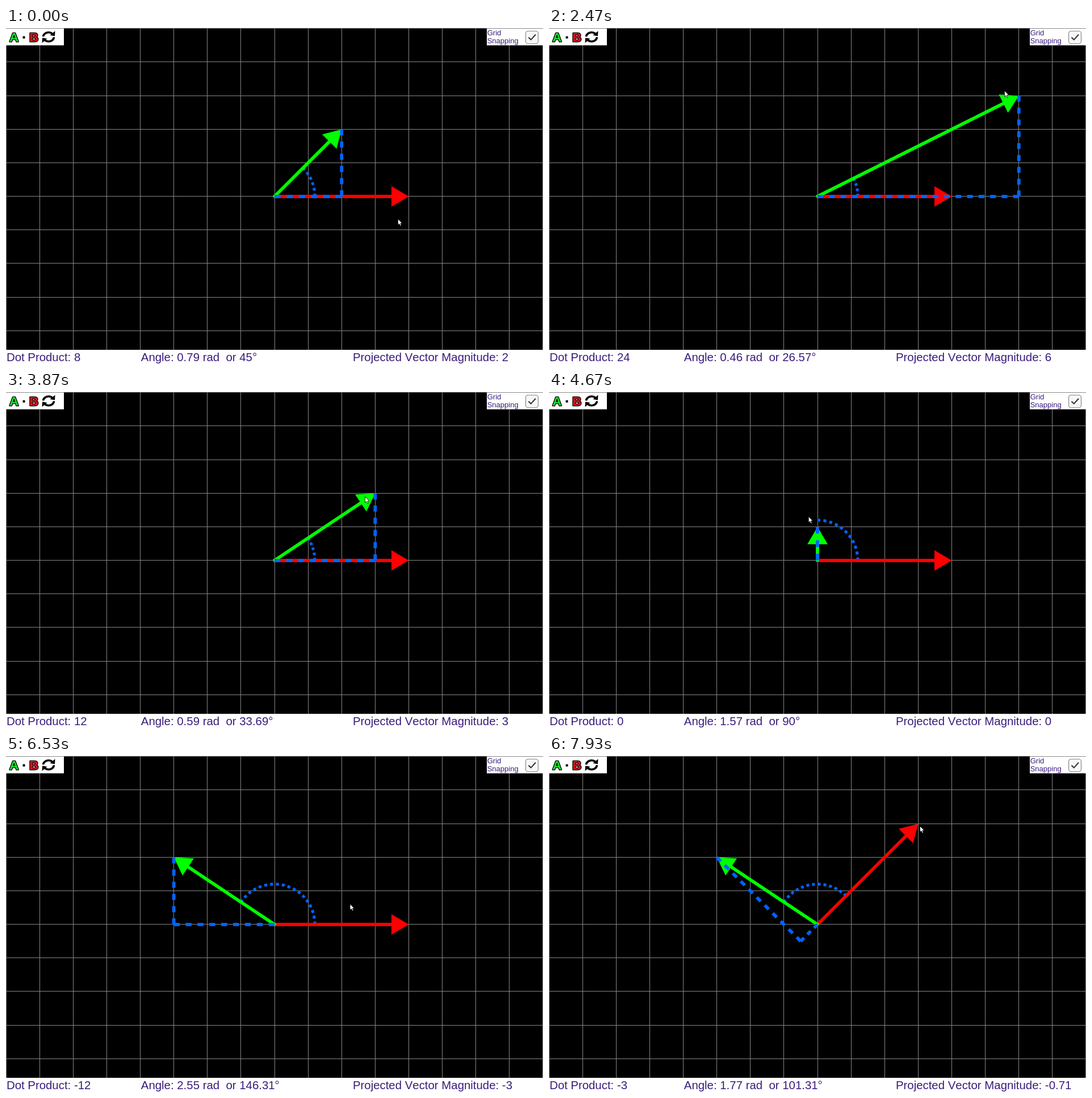
An HTML page with a canvas that plays this animation: 946x592 px, repeating every 8 s.

```html
<!DOCTYPE html>
<html>
<head>
<meta charset="utf-8">
<title>Dot product</title>
<style>
  html, body { margin: 0; width: 100%; height: 100%; overflow: hidden; background: #000; }
  canvas { display: block; }
</style>
</head>
<body>
<canvas id="stage" width="946" height="592"></canvas>
<script>
const ctx = document.getElementById('stage').getContext('2d');
const LOOP = 8000, FPS = 15;
const OX = 473, OY = 296.8, CELL = 59.125;
const RED = '#f00', GREEN = '#0f0', BLUE = '#0064ff', PURPLE = '#3b1c7c';
const SANS = '"Liberation Sans", Arial, sans-serif';

// Pointer moves: start, end, x, y, ease-out power (linear by default)
const HOME = [690, 336];
const MOVES = [
  [0, 733, 574, 200, 1.5],
  [800, 933, 581, 198],
  [1267, 2467, 802, 110],
  [2733, 3467, 648, 165],
  [3733, 3867, 632, 184],
  [3867, 5400, 296, 251],
  [5400, 5867, 316, 154],
  [6267, 7133, 692, 292, 4],
  [7200, 7933, 653, 123]
];
// Vector A follows the pointer in this window, vector B from then on
const DRAG_A = [1267, 5900], DRAG_B = 7200;

const clamp = (v, lo, hi) => Math.min(hi, Math.max(lo, v));

function pointer(t) {
  let [px, py] = HOME;
  for (const [from, to, x, y, power = 1] of MOVES) {
    const u = clamp((t - from) / (to - from), 0, 1);
    const p = 1 - (1 - u) ** power;
    px += (x - px) * p;
    py += (y - py) * p;
  }
  return [px, py];
}

function snap([x, y]) {
  return { x: Math.round((x - OX) / CELL), y: Math.round((OY - y) / CELL) };
}

const toScreen = p => [OX + p.x * CELL, OY - p.y * CELL];

function poly(color, points) {
  ctx.fillStyle = color;
  ctx.beginPath();
  points.forEach(p => ctx.lineTo(...p));
  ctx.closePath();
  ctx.fill();
}

function box(color, x, y, w, h) {
  ctx.fillStyle = color;
  ctx.fillRect(x, y, w, h);
}

function text(str, x, y, size) {
  ctx.font = size + 'px ' + SANS;
  ctx.fillStyle = PURPLE;
  ctx.fillText(str, x, y);
}

function arrow(v, color) {
  const length = Math.hypot(v.x, v.y) * CELL;
  ctx.save();
  ctx.translate(OX, OY);
  ctx.rotate(-Math.atan2(v.y, v.x));
  box(color, -2, -2.9, length - 26, 5.8);
  poly(color, [[length, 0], [length - 30.5, -18], [length - 30.5, 18]]);
  ctx.restore();
}

// Dashes are fitted so that both ends of the stroke carry one
function dashed(length, period, width) {
  if (length < 1) return;
  const dash = length / (2 * Math.max(1, Math.round(length / period - 0.5)) + 1);
  ctx.strokeStyle = BLUE;
  ctx.lineWidth = width;
  ctx.setLineDash([dash, dash]);
  ctx.stroke();
  ctx.setLineDash([]);
}

function dashedLine(p, q) {
  const [x1, y1] = toScreen(p), [x2, y2] = toScreen(q);
  ctx.beginPath();
  ctx.moveTo(x1, y1);
  ctx.lineTo(x2, y2);
  dashed(Math.hypot(x2 - x1, y2 - y1), 20.7, 5.8);
}

function grid() {
  box('#000', 0, 0, 946, 592);
  for (let i = 0; i <= 16; i++) box('#868686', Math.min(945, Math.floor(CELL * i)), 0, 1, 592);
  for (let k = -5; k < 5; k++) box('#868686', 0, Math.floor(296.55 + 59.16 * k), 946, 1);
}

function letter(ch, x, color) {
  ctx.font = 'bold 22.5px ' + SANS;
  ctx.textAlign = 'center';
  ctx.lineJoin = 'round';
  ctx.strokeStyle = '#000';
  ctx.lineWidth = 2.6;
  ctx.strokeText(ch, x, 24);
  ctx.fillStyle = color;
  ctx.fillText(ch, x, 24);
  ctx.textAlign = 'left';
}

function swapIcon() {
  ctx.save();
  ctx.translate(75, 15.7);
  ctx.strokeStyle = '#000';
  ctx.lineWidth = 3.6;
  for (let i = 0; i < 2; i++) {
    ctx.beginPath();
    ctx.ellipse(0, 0, 9.5, 8, 0, Math.PI * 1.02, Math.PI * 1.75);
    ctx.stroke();
    poly('#000', [[11.5, -10.5], [11, -1.5], [2.5, -3]]);
    ctx.rotate(Math.PI);
  }
  ctx.restore();
}

function panels() {
  box('#fff', 0, 1, 102, 29.5);
  letter('A', 14, '#1be32a');
  box('#000', 29.5, 14.5, 4, 4);
  letter('B', 49, '#e0161c');
  swapIcon();

  box('#fff', 847, 1, 99, 29.5);
  text('Grid', 847.7, 13, 13);
  text('Snapping', 847.7, 27, 13);
  ctx.beginPath();
  ctx.roundRect(915.5, 5.5, 22, 22, 4);
  ctx.fillStyle = '#f7f7f7';
  ctx.fill();
  ctx.strokeStyle = '#8a8a8a';
  ctx.lineWidth = 1.2;
  ctx.stroke();
  ctx.beginPath();
  ctx.moveTo(920.5, 16.5);
  ctx.lineTo(924.8, 20.7);
  ctx.lineTo(933, 11.5);
  ctx.strokeStyle = '#333';
  ctx.lineWidth = 2;
  ctx.stroke();

  box('#fff', 0, 567, 946, 25);
}

function cursor([x, y]) {
  ctx.save();
  ctx.translate(x + 0.5, y + 0.5);
  poly('#fff', [[0, 0], [0, 10.5], [2.4, 8.4], [4.1, 12.2], [5.9, 11.4], [4.3, 7.8], [7.3, 7.5]]);
  ctx.strokeStyle = '#000';
  ctx.lineWidth = 0.8;
  ctx.stroke();
  ctx.restore();
}

const short = n => String(+n.toFixed(2));

function draw(t) {
  const a = snap(pointer(clamp(t, ...DRAG_A)));
  const b = snap(pointer(Math.max(DRAG_B, t)));
  const dot = a.x * b.x + a.y * b.y;
  const sizeB = Math.hypot(b.x, b.y);
  const k = dot / (sizeB * sizeB);
  const foot = { x: b.x * k, y: b.y * k };
  const angA = Math.atan2(a.y, a.x), angB = Math.atan2(b.y, b.x);
  const angle = Math.abs(angA - angB);

  grid();
  ctx.beginPath();
  ctx.arc(OX, OY, 71, -angB, -angA, angA > angB);
  dashed(71 * angle, 10.3, 5);
  arrow(b, RED);
  arrow(a, GREEN);
  dashedLine({ x: 0, y: 0 }, foot);
  dashedLine(foot, a);

  panels();
  text('Dot Product: ' + short(dot), 0.9, 586.8, 20.4);
  text(`Angle: ${short(angle)} rad  or ${short(angle * 180 / Math.PI)}°`, 237.8, 586.8, 20.4);
  text('Projected Vector Magnitude: ' + short(dot / sizeB), 610.9, 586.8, 20.4);
  cursor(pointer(t));
}

ctx.fontKerning = 'none';
const start = performance.now();
function tick() {
  const t = (performance.now() - start) % LOOP;
  draw(Math.floor(t * FPS / 1000 + 0.06) * 1000 / FPS);
  requestAnimationFrame(tick);
}
tick();
</script>
</body>
</html>
```
